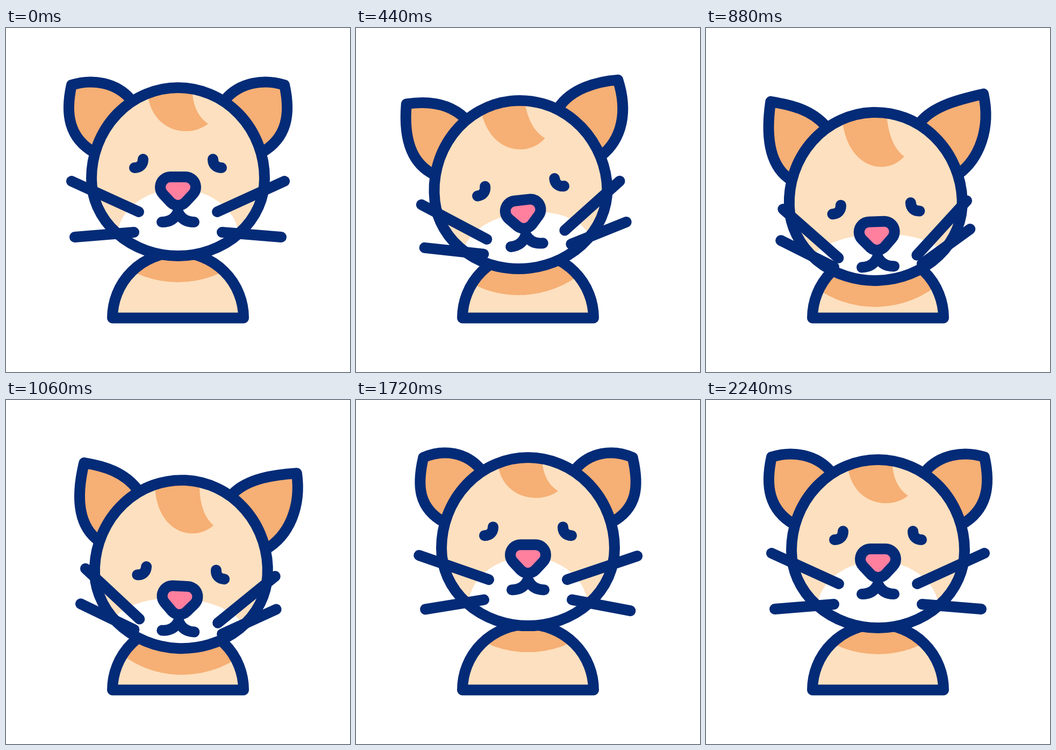
An HTML page with a canvas that plays this animation: 640 by 640 pixels, repeating every 2.4 s.

```html
<!DOCTYPE html>
<html lang="en">
<head>
<meta charset="utf-8">
<title>Nodding cat</title>
<style>
  html, body { margin: 0; width: 100%; height: 100%; overflow: hidden; background: #fff; }
  canvas { display: block; width: 640px; height: 640px; }
</style>
</head>
<body>
<canvas id="stage" width="640" height="640"></canvas>
<script>
const ctx = document.getElementById('stage').getContext('2d');
const LOOP = 2400, CX = 320, CY = 267.5;
const NAVY = '#032b77', SKIN = '#fde0bf', ORANGE = '#f6af74', PINK = '#ff7f9f', WHITE = '#fff';

// [time, value] with ease in and out between neighbours.
// nod: 1 is fully down, -1 fully up. tilt: degrees, negative leans left.
const NOD = [[0, 0], [860, 1], [1625, 0], [1900, -1], [2240, 0]];
const TILT = [[0, 0], [610, -8], [1140, 3.5], [1680, 0]];

function ease(keys, t) {
  const i = keys.findIndex(k => k[0] > t);
  if (i < 0) return keys[keys.length - 1][1];
  const [t0, a] = keys[i - 1], [t1, b] = keys[i];
  const p = (t - t0) / (t1 - t0);
  return a + (b - a) * p * p * (3 - 2 * p);
}

const rad = degrees => degrees * Math.PI / 180;

// Every part follows the nod; the head slides sideways with its tilt.
function pose(t) {
  const nod = ease(NOD, t), tilt = ease(TILT, t);
  const mix = (down, up) => nod * (nod > 0 ? down : up);
  return {
    nod,
    tilt: rad(tilt),
    x: 2.28 * tilt,
    y: mix(46, 14),
    face: mix(37.5, 14),
    jaw: 16 * nod,
    patch: 18 * nod,
    earX: mix(9.5, 0),
    earY: mix(-22, -17),
    earIn: mix(0, -12),
    upper: 20 * nod,
    lower: mix(36, 19)
  };
}

const body = new Path2D('M198 539.5A122 122 0 0 1 442 539.5Z');
const head = new Path2D('M159 280A161 169 0 0 1 481 280A161 144 0 0 1 159 280Z');
const patch = new Path2D('M263 85V111C263 160 294 192 335 192C352 192 366 186 376 178C358 166 347 145 346 111V85Z');
const eye = new Path2D('M255 244C255 254 249 260 239 260');
const mouth = new Path2D('M290 361Q312 361 320 342Q328 361 350 361');
const nose = new Path2D('M306 296H334L320 311Z');

function fill(path, color) {
  ctx.fillStyle = color;
  ctx.fill(path);
}

function line(path, color = NAVY, width = 20) {
  ctx.strokeStyle = color;
  ctx.lineWidth = width;
  ctx.stroke(path);
}

function group(draw) {
  ctx.save();
  draw();
  ctx.restore();
}

function place(p, drop = 0) {
  ctx.translate(CX + p.x, CY + p.y + drop);
  ctx.rotate(p.tilt);
  ctx.translate(-CX, -CY);
}

// Draws the left part, then its mirror image.
function both(draw) {
  for (const side of [1, -1]) group(() => {
    if (side < 0) {
      ctx.translate(2 * CX, 0);
      ctx.scale(-1, 1);
    }
    draw(side);
  });
}

// The base stays on the head; a raised tip pulls the curves straight.
function ear(dx, dy) {
  const e = new Path2D();
  e.moveTo(232, 133);
  e.bezierCurveTo(205, 101, 160 + dx, 94 + dy * 0.1, 122 + dx, 106 + dy);
  e.bezierCurveTo(110 + dx, 160 + dy * 0.5, 117 - dy * 0.35, 205, 165, 232);
  fill(e, ORANGE);
  line(e);
}

function whisker(x, y, dx, dy, degrees) {
  const c = Math.cos(rad(degrees)), s = Math.sin(rad(degrees)), w = new Path2D();
  w.moveTo(x, y);
  w.lineTo(x + dx * c - dy * s, y + dx * s + dy * c);
  line(w);
}

function drawBody(p) {
  fill(body, SKIN);
  group(() => {
    ctx.clip(body);
    place(p, 39);
    fill(head, ORANGE);
    line(head, ORANGE);
  });
  line(body);
}

function drawHead(p) {
  both(side => ear(side * p.earX + p.earIn, p.earY));
  fill(head, SKIN);
  group(() => {
    ctx.clip(head);
    const muzzle = new Path2D();
    muzzle.ellipse(CX, 390, 113 + p.face * 0.35, 90 - p.face, 0, 0, 2 * Math.PI);
    fill(muzzle, WHITE);
    ctx.translate(0, 111);
    ctx.scale(1, 1 + p.patch / 70);
    ctx.translate(0, -111);
    fill(patch, ORANGE);
  });
  line(head);
}

function drawFace(p) {
  both(side => {
    whisker(238, 380 + p.jaw, -110, 9, p.lower - 2.6 * side * p.nod);
    ctx.translate(0, p.face);
    whisker(247, 342, -125, -57, p.upper - side * p.nod);
    line(eye);
  });
  ctx.translate(0, p.face);
  line(mouth);
  line(nose, NAVY, 58);
  line(nose, PINK, 18);
  fill(nose, PINK);
}

function draw(t) {
  const p = pose(t);
  ctx.fillStyle = WHITE;
  ctx.fillRect(0, 0, 640, 640);
  ctx.lineCap = ctx.lineJoin = 'round';
  drawBody(p);
  group(() => {
    place(p);
    drawHead(p);
    drawFace(p);
  });
}

const start = performance.now();
function tick() {
  draw((performance.now() - start) % LOOP);
  requestAnimationFrame(tick);
}
tick();
</script>
</body>
</html>
```
